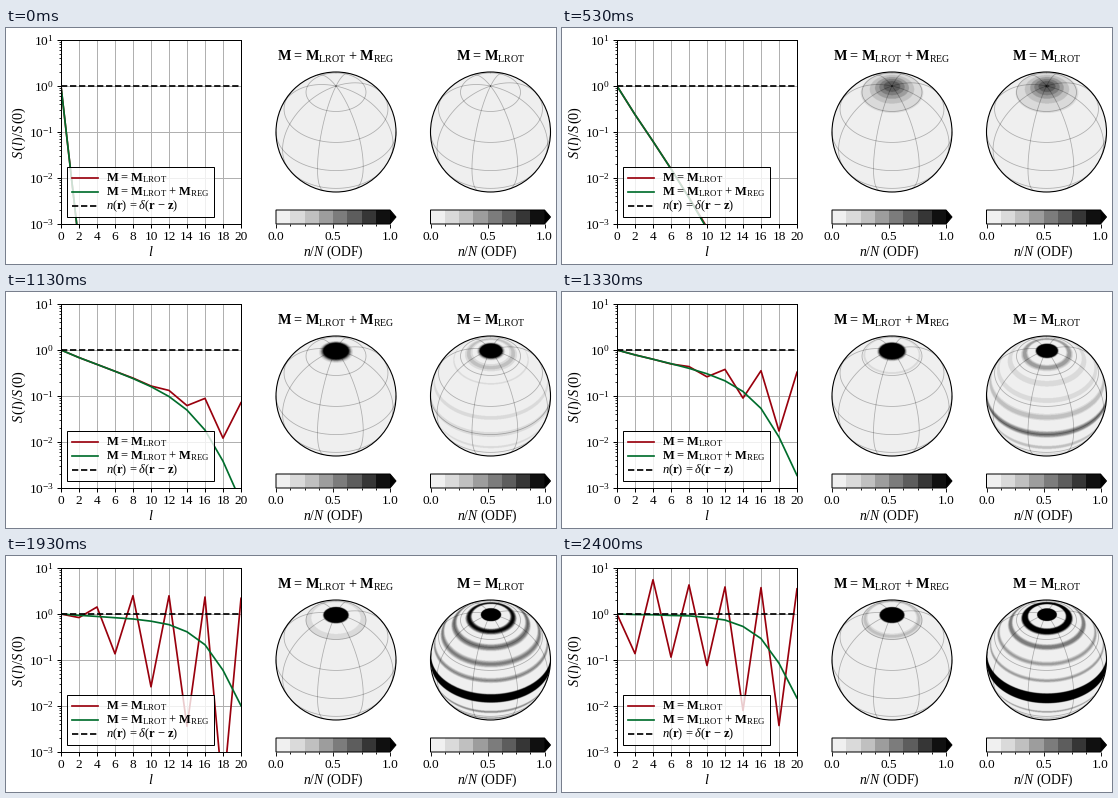
Animation of 550 by 236 pixels, one loop 2470 ms. Source, as a matplotlib script:

```python
import numpy as np
import matplotlib.pyplot as plt
from matplotlib.animation import FuncAnimation
from matplotlib.patches import Circle, Polygon, Rectangle
from matplotlib.ticker import FixedLocator, LogLocator, NullFormatter

W, H, DPI = 550, 236, 64
PT = 72 / DPI                      # points per pixel
LOOP_MS, TICK_MS = 2470, 19
STATES, RATE = 37, 15              # poses per loop, poses per second
STEPS_PER_STATE, DT = 3, 0.0316
RED, GREEN = "#99000d", "#006d2c"
RADIUS, TILT, TURN = 60, np.radians(40), -18
SERIF = "Liberation Serif"

plt.rcParams.update({
    "font.family": SERIF,
    "mathtext.fontset": "custom",
    "mathtext.rm": SERIF,
    "mathtext.it": SERIF + ":italic",
    "mathtext.bf": SERIF + ":bold",
    "mathtext.cal": SERIF + ":italic",
})

# Lattice rotation under uniaxial compression, in Legendre moments
l = np.arange(0, 21, 2)
a = 1.5 * l * (l + 1) / (2 * l + 1)
rotation = (np.diag(a * (2 * l + 1) / ((2 * l - 1) * (2 * l + 3)))
            + np.diag((a * (l - 1) / (2 * l - 1))[1:], -1)
            - np.diag((a * (l + 2) / (2 * l + 3))[:-1], 1))
damping = np.diag(18.1 * (l * (l + 1) / 420) ** 3)


def evolve(matrix):
    """Moments at every pose, by forward Euler from an isotropic state."""
    p = np.zeros(len(l))
    p[0] = 1
    states = []
    for step in range(STEPS_PER_STATE * (STATES - 1) + 1):
        p = p + DT * matrix @ p
        if step % STEPS_PER_STATE == 0:
            states.append(p)
    return states


free = evolve(rotation)
regular = evolve(rotation - damping)

# Distribution on the sphere, seen with the pole tilted towards the viewer
OVERSAMPLE = 3
mu_table = np.linspace(0, 1, 3000)
basis = np.polynomial.legendre.legvander(mu_table, 20)[:, ::2]
basis = basis * (2 * l + 1) / (4 * np.pi)
side = (np.arange(OVERSAMPLE * RADIUS * 2) + 0.5) / (OVERSAMPLE * RADIUS) - 1
gx, gy = np.meshgrid(side, -side)
gz = np.sqrt(np.maximum(0, 1 - gx ** 2 - gy ** 2))
mu = np.abs(gy * np.cos(TILT) + gz * np.sin(TILT))
mu_index = np.minimum(mu * 2999 + 0.5, 2999).astype(int)
shades = plt.get_cmap("Greys")(
    np.minimum(1, 0.07 + 0.93 * (np.arange(9) + 0.5) / 8))[:, :3]


def shade(p):
    band = np.clip(np.floor(basis @ p * 8), 0, 8).astype(int)
    return shades[band][mu_index]


fig = plt.figure(figsize=(W / DPI, H / DPI), dpi=DPI, facecolor="white")

# Spectrum plot
LEFT, RIGHT, TOP, BOTTOM = 55, 235, 12, 196
ax = fig.add_axes([LEFT / W, 1 - BOTTOM / H,
                   (RIGHT - LEFT) / W, (BOTTOM - TOP) / H])
ax.set_yscale("log")
ax.set_xlim(0, 20)
ax.set_ylim(1e-3, 10)
ax.xaxis.set_major_locator(FixedLocator(l))
ax.yaxis.set_major_locator(LogLocator(10, numticks=10))
ax.yaxis.set_minor_locator(LogLocator(10, subs=np.arange(2, 10), numticks=10))
ax.yaxis.set_minor_formatter(NullFormatter())
ax.tick_params(labelsize=13.4 * PT, length=4 * PT, width=PT, pad=3 * PT)
ax.tick_params(which="minor", length=2.2 * PT, width=0.8 * PT)
ax.grid(color="#b0b0b0", lw=PT)
ax.set_axisbelow(True)
for spine in ax.spines.values():
    spine.set_linewidth(PT)

LINE = 1.7 * PT
red_line, = ax.plot(l, np.ones(len(l)), color=RED, lw=LINE)
green_line, = ax.plot(l, np.ones(len(l)), color=GREEN, lw=LINE)
ax.plot([0, 20], [1, 1], "k--", lw=LINE)

# Everything else sits on a layer measured in pixels
layer = fig.add_axes([0, 0, 1, 1], facecolor="none")
layer.set_xlim(0, W)
layer.set_ylim(H, 0)
layer.axis("off")


def text(x, y, s, size, ha="center", **kw):
    return layer.text(x, y, s, size=size * PT, ha=ha,
                      **{"va": "baseline", **kw})


def spaced(sign):
    return r"\hspace{0.12}" + sign + r"\hspace{0.12}"


M_FREE = r"\mathbf{M}" + spaced("=") + r"\mathbf{M}_{\mathrm{LROT}}"
M_REG = M_FREE + spaced("+") + r"\mathbf{M}_{\mathrm{REG}}"
DELTA = (r"n(\mathbf{r})" + spaced("=")
         + r"\delta(\mathbf{r}" + spaced("-") + r"\mathbf{z})")

text(145, 228, "$l$", 14.2)
text(13, 104, r"$S\,(l)/S\,(0)$", 14.2, rotation=90, va="center")

layer.add_patch(Rectangle((61, 139), 147, 50, fc=(1, 1, 1, 0.8),
                          ec="black", lw=PT))
for y, color, style, label in ((149.5, RED, "-", M_FREE),
                               (163.5, GREEN, "-", M_REG),
                               (177.5, "black", "--", DELTA)):
    layer.plot([66, 92], [y, y], color=color, ls=style, lw=LINE)
    text(99.5, y + 4, f"${label}$", 12.5, ha="left")


def graticule(cx, cy, lon, lat):
    x = np.cos(lat) * np.sin(lon)
    y = np.cos(TILT) * np.sin(lat) - np.sin(TILT) * np.cos(lat) * np.cos(lon)
    z = np.sin(TILT) * np.sin(lat) + np.cos(TILT) * np.cos(lat) * np.cos(lon)
    x = np.where(z >= 0, x, np.nan)
    layer.plot(cx + RADIUS * x, cy - RADIUS * y, color="black",
               alpha=0.27, lw=0.8 * PT, zorder=2)


def sphere(cx, cy, title):
    """Globe with title and colour bar; returns its image."""
    layer.add_patch(Circle((cx, cy), RADIUS, fill=False, ec="black",
                           lw=1.1 * PT, zorder=3))
    image = layer.imshow(shade(free[0]), aspect="auto", zorder=1,
                         interpolation="hanning",
                         extent=(cx - RADIUS, cx + RADIUS,
                                 cy + RADIUS, cy - RADIUS))
    image.set_clip_path(Circle((cx, cy), RADIUS,
                               transform=layer.transData))
    around = np.linspace(-np.pi, np.pi, 181)
    for lat in np.radians([-60, -30, 0, 30, 60]):
        graticule(cx, cy, around, np.full(181, lat))
    for lon in np.radians(TURN + np.arange(0, 360, 45)):
        graticule(cx, cy, np.full(181, lon), around / 2)
    text(cx, 33, f"${title}$", 14.2)

    x0, x1, y0, y1 = cx - RADIUS, cx + RADIUS - 6, 182, 196
    cell = (x1 - x0) / 8
    for i in range(8):
        layer.add_patch(Rectangle((x0 + i * cell, y0), cell, y1 - y0,
                                  fc=shades[i], lw=0))
    mid = (y0 + y1) / 2
    layer.add_patch(Polygon([(x1, y0), (x1 + 6, mid), (x1, y1)],
                            fc=shades[8], lw=0))
    layer.add_patch(Polygon([(x0, y0), (x1, y0), (x1 + 6, mid),
                             (x1, y1), (x0, y1)],
                            fill=False, ec="black", lw=PT))
    for i in range(9):
        x = x0 + i * cell
        length = 2.2 if i % 4 else 4
        layer.plot([x, x], [y1, y1 + length], color="black", lw=0.9 * PT,
                   solid_capstyle="butt")
        if i % 4 == 0:
            text(x, 212, f"{i / 8:.1f}", 13.4)
    text((x0 + x1) / 2, 227.5, "$n/N$ (ODF)", 13.6)
    return image


regular_image = sphere(330, 104, M_REG)
free_image = sphere(484.5, 104, M_FREE)


def update(tick):
    # A pose begins with the first tick that reaches it (10 ms clock)
    t = (tick + 1) * TICK_MS - 1 + 7
    k = min(STATES - 1, int(t * RATE / 1000))
    red_line.set_ydata(np.maximum(free[k] ** 2, 1e-12))
    green_line.set_ydata(np.maximum(regular[k] ** 2, 1e-12))
    regular_image.set_data(shade(regular[k]))
    free_image.set_data(shade(free[k]))
    return red_line, green_line, regular_image, free_image


anim = FuncAnimation(fig, update, frames=LOOP_MS // TICK_MS,
                     interval=TICK_MS, repeat=True, repeat_delay=0,
                     blit=False)
plt.show()
```
